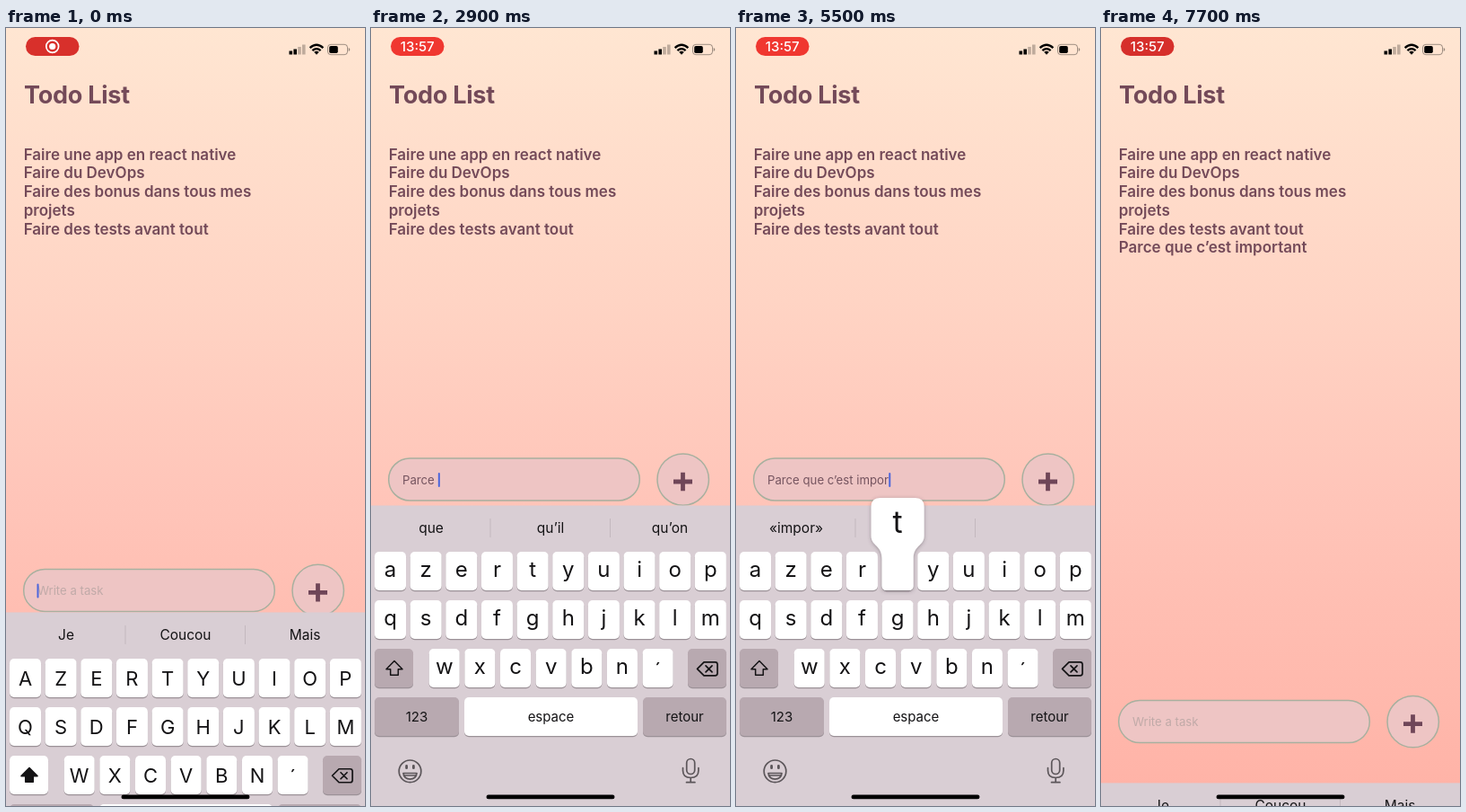
An HTML page that plays this animation: 400 px wide and 866 px high, repeating every 7.8 s.

```html
<!DOCTYPE html>
<html lang="fr">
<head>
<meta charset="utf-8">
<title>Todo List</title>
<style>
  html, body { margin: 0; width: 100%; height: 100%; overflow: hidden; background: #ffd4c4; }
  svg { display: block; width: 400px; height: 866px; font-family: Inter, Roboto, sans-serif; }
  text { white-space: pre; }
  .title { font-weight: 700; font-size: 27px; letter-spacing: -.25px; fill: #744a59; }
  .item { font-weight: 600; font-size: 17px; fill: #744a59; }
  .box { fill: #eec5c4; stroke: #a8b09f; stroke-width: 1.5; }
  .field { font-size: 13.2px; }
  .mid { text-anchor: middle; fill: #141315; }
  .cap { font-size: 22px; }
  .low { font-size: 24px; }
  .label { font-size: 15px; }
  .hint { font-size: 15.5px; }
  .big { font-size: 34px; }
  .line { fill: none; stroke: #5b5559; stroke-width: 1.7; stroke-linecap: round; stroke-linejoin: round; }
</style>
</head>
<body>
<svg viewBox="0 0 400 866">
  <defs>
    <linearGradient id="sky" x1="0" y1="0" x2="0" y2="1">
      <stop offset="0" stop-color="#ffe6d2"/>
      <stop offset=".35" stop-color="#ffd4c4"/>
      <stop offset=".6" stop-color="#ffc5b9"/>
      <stop offset="1" stop-color="#ffb2a6"/>
    </linearGradient>
    <filter id="soft" x="-20%" y="-20%" width="140%" height="140%">
      <feDropShadow dx="0" dy="1" stdDeviation="2" flood-color="#4a4048" flood-opacity=".45"/>
    </filter>
  </defs>
  <rect width="400" height="866" fill="url(#sky)"/>

  <rect id="pill" x="22" y="10" width="59.5" height="21" rx="10.5"/>
  <g id="rec">
    <circle cx="51.7" cy="20.5" r="6.9" fill="none" stroke="#fff" stroke-width="1.7"/>
    <circle cx="51.7" cy="20.5" r="3.6" fill="#fff"/>
  </g>
  <text id="clock" x="51.7" y="25.8" text-anchor="middle" font-size="15" font-weight="500" fill="#fff">13:57</text>

  <path d="M315.5 25.5h3.6v4h-3.6zM320.4 23.5h3.6v6h-3.6z"/>
  <path d="M325.2 21h3.6v8.5h-3.6zM330 18.5h3.6v11h-3.6z" opacity=".25"/>
  <g fill="none" stroke="#000" stroke-width="2.3">
    <path d="M338.6 22.1Q346 15.3 353.4 22.1M341.4 25.2Q346 21 350.6 25.2"/>
    <path d="M343.2 26.8Q346 24.6 348.8 26.8L346 29.8z" fill="#000" stroke="none"/>
  </g>
  <rect x="358.5" y="18.3" width="22" height="11.4" rx="3.4" fill="none" stroke="#000" stroke-opacity=".38"/>
  <rect x="360.2" y="20" width="9.6" height="8" rx="1.8"/>
  <path d="M381.7 22v4q1.6-.6 1.6-2t-1.6-2z" opacity=".4"/>

  <text class="title" x="20" y="84">Todo List</text>
  <g id="list"></g>

  <g id="bar">
    <rect class="box" x="19.7" y="479" width="279.6" height="47" rx="23.5"/>
    <text id="field" class="field" x="35" y="507.6"></text>
    <rect id="caret" y="495" width="2" height="16" rx="1" fill="#4c66dc"/>
    <g id="add">
      <circle class="box" cx="347.7" cy="502.6" r="28.7"/>
      <path d="M337 505h21M347.5 494.8v20.4" stroke="#6f4658" stroke-width="4.8"/>
    </g>
  </g>

  <g id="board">
    <rect y="531.5" width="400" height="340" fill="#d9ced4"/>
    <path d="M133 546v21M266.5 546v21" stroke="#c3b8be"/>
    <g id="hints"></g>
    <g id="keys"></g>
    <path id="shift" d="M26 704.5l9 9.2h-4.7v6.6h-8.6v-6.6H17z" stroke="#141315" stroke-width="1.5" stroke-linejoin="round"/>
    <path class="line" style="stroke:#141315" d="M371 705.8h12.5q2.5 0 2.5 2.5v10q0 2.5-2.5 2.5H371l-7.5-7.5zM373 709.8l7 7m0-7l-7 7"/>
    <g class="line">
      <circle cx="43.5" cy="827.3" r="12.3"/>
      <path d="M36 829.5h15q-1 6.6-7.500 6.600t-7.500-6.600zM36.500 832h14"/>
      <path d="M39.600 821.500v2.200M47.400 821.500v2.200" stroke-width="2.800"/>
      <rect x="351.700" y="813.500" width="9" height="17" rx="4.500"/>
      <path d="M347.500 823.500v3q0 8 8.700 8t8.700-8v-3M356.200 834.500v5M351.500 839.700h9.400"/>
    </g>
    <g id="pop">
      <path id="bubble" fill="#fff" filter="url(#soft)"/>
      <text id="glyph" class="mid big"></text>
    </g>
  </g>
  <rect x="128.500" y="853.500" width="143" height="4.800" rx="2.400"/>
</svg>
<script>
const LOOP = 7800, STEP = 100, HOLD = 100, SENT = 7450;
const GREY = '#b8a9b0';
const TASK = 'Parce que c’est important ';
const PRESS = [1690, 1880, 2070, 2330, 2560, 2760, 2960, 3130, 3290, 3430,
  3740, 3950, 4070, 4220, 4370, 4520, 4650,
  4830, 4980, 5130, 5290, 5430, 5560, 5710, 5840, 5980];
// Suggestions keyed by the number of typed characters.
const HINTS = {
  0: ['Je', 'Coucou', 'Mais'],
  3: ['«Par»', 'Parce', 'Pars'],
  6: ['que', 'qu’il', 'qu’on'],
  10: ['y’a', 'je', 'c’est'],
  16: ['pas', 'bien', 'un'],
  26: ['de', 'pour', '']
};
const ACCENT = { a: '`', u: '`', i: 'ˆ', o: 'ˆ', c: '’', q: '’' };

const $ = id => document.getElementById(id);
const put = (parent, tag, attrs, text = '') => {
  const el = document.createElementNS('http://www.w3.org/2000/svg', tag);
  for (const k in attrs) el.setAttribute(k, attrs[k]);
  el.textContent = text;
  return parent.appendChild(el);
};

const items = ['Faire une app en react native', 'Faire du DevOps',
  'Faire des bonus dans tous mes', 'projets', 'Faire des tests avant tout', TASK.trim()]
  .map((s, i) => put($('list'), 'text', { class: 'item', x: 19.7, y: 146.5 + 20.75 * i }, s));
const hints = [67, 200, 333].map(x => put($('hints'), 'text', { class: 'mid hint', x, y: 562 }));

function keyCap(x, y, w, fill) {
  put($('keys'), 'rect', { x, y: y + 1.2, width: w, height: 43, rx: 5, fill: '#9b9197' });
  return put($('keys'), 'rect', { x, y, width: w, height: 43, rx: 5, fill });
}

const keys = {};
[['azertyuiop', 21.5, 35], ['qsdfghjklm', 21.5, 35], ['wxcvbn’', 81.7, 34]].forEach(([row, x0, w], r) => {
  [...row].forEach((ch, i) => {
    const x = x0 + 39.65 * i, y = 583 + 54 * r;
    keyCap(x - w / 2, y, w, '#fff');
    keys[ch] = { x, y, w, label: put($('keys'), 'text', { x }) };
  });
});
const shiftKey = keyCap(4, 691, 43, '#fff');
keyCap(353, 691, 43, GREY);
keyCap(4, 745, 94, GREY);
const spaceKey = keyCap(104, 745, 193, '#fff');
keyCap(303, 745, 93, GREY);
[['123', 51], ['espace', 200.5], ['retour', 349.5]].forEach(([s, x]) =>
  put($('keys'), 'text', { class: 'mid label', x, y: 771.5 }, s));

// Critically damped spring, 0 to 1.
const spring = (ms, w) => {
  const a = Math.max(0, ms) / 1000 * w;
  return 1 - (1 + a) * Math.exp(-a);
};
const slide = (el, y) => el.setAttribute('transform', `translate(0 ${y.toFixed(2)})`);
const show = (el, on) => el.setAttribute('opacity', +on);

function bubblePath({ x, y, w }) {
  const l = x - w / 2, r = x + w / 2, b = Math.min(337, Math.max(4, x - 29.5)), e = b + 59;
  return `M${b + 10} ${y - 60}h39q10 0 10 10V${y - 18}C${e} ${y - 6} ${r} ${y - 8} ${r} ${y + 8}` +
    `V${y + 38}q0 5-5 5H${l + 5}q-5 0-5-5V${y + 8}C${l} ${y - 8} ${b} ${y - 6} ${b} ${y - 18}V${y - 50}q0-10 10-10z`;
}

function drawKeys(upper, last) {
  for (const ch in keys) {
    const { y, label } = keys[ch], accent = ch === '’';
    label.textContent = accent ? ACCENT[last] || '´' : upper ? ch.toUpperCase() : ch;
    label.setAttribute('class', 'mid ' + (upper || accent ? 'cap' : 'low'));
    label.setAttribute('y', y + (accent ? 32 : upper ? 30 : 28));
  }
  shiftKey.setAttribute('fill', upper ? '#fff' : GREY);
  $('shift').setAttribute('fill', upper ? '#141315' : 'none');
}

function drawPress(t) {
  const i = PRESS.findIndex(p => t >= p && t < p + HOLD);
  const ch = i < 0 ? '' : TASK[i], key = keys[ch.toLowerCase()];
  spaceKey.setAttribute('fill', ch === ' ' ? GREY : '#fff');
  show($('pop'), !!key);
  if (!key) return;
  $('bubble').setAttribute('d', bubblePath(key));
  $('glyph').setAttribute('x', Math.min(337, Math.max(4, key.x - 29.5)) + 29.5);
  $('glyph').setAttribute('y', key.y - 21);
  $('glyph').textContent = ch;
}

function drawField(t, count) {
  const typed = TASK.slice(0, count), field = $('field');
  field.textContent = typed || 'Write a task';
  field.setAttribute('fill', typed ? '#75545f' : '#c0aaa8');
  const since = count ? t - PRESS[count - 1] - HOLD : t;
  const phase = since % 1000;
  const glow = phase < 600 ? 1 : phase < 850 ? 1 - (phase - 600) / 250 : Math.max(0, (phase - 900) / 100);
  $('caret').setAttribute('x', typed ? 35.3 + field.getComputedTextLength() : 34.5);
  show($('caret'), t < SENT ? glow : 0);
}

function draw(t) {
  const sent = t >= SENT;
  const count = sent ? 0 : PRESS.filter(p => t >= p + HOLD).length;
  const typed = TASK.slice(0, count);

  const down = sent ? spring(t - 7400, 14) : 1 - spring(t + 157, 14);
  const drop = sent ? spring(t - 7400, 19.5) : 1 - spring(t + 132, 14);
  slide($('board'), 335 * down);
  slide($('bar'), 275 * drop);

  const lit = .5 - .5 * Math.cos((t - 3800) / 1300 * 2 * Math.PI);
  $('pill').setAttribute('fill', `rgb(${214 + 38 * lit},${47 + 12 * lit},${43 + 7 * lit})`);
  show($('rec'), t < 1300);
  show($('clock'), t >= 1300);

  show(items[5], sent);
  show($('add'), t >= 7300 && t < SENT ? .3 : sent ? Math.min(1, .4 + (t - SENT) / 250) : 1);
  drawField(t, count);
  drawKeys(!count, typed.slice(-1).toLowerCase());
  drawPress(t);
  const words = HINTS[count] || [`«${typed.trim().split(' ').pop()}»`, '', ''];
  hints.forEach((el, i) => el.textContent = words[i]);
}

const start = performance.now();
function tick() {
  const t = (performance.now() - start) % LOOP;
  draw(Math.floor(t / STEP) * STEP);
  requestAnimationFrame(tick);
}
tick();
</script>
</body>
</html>
```
